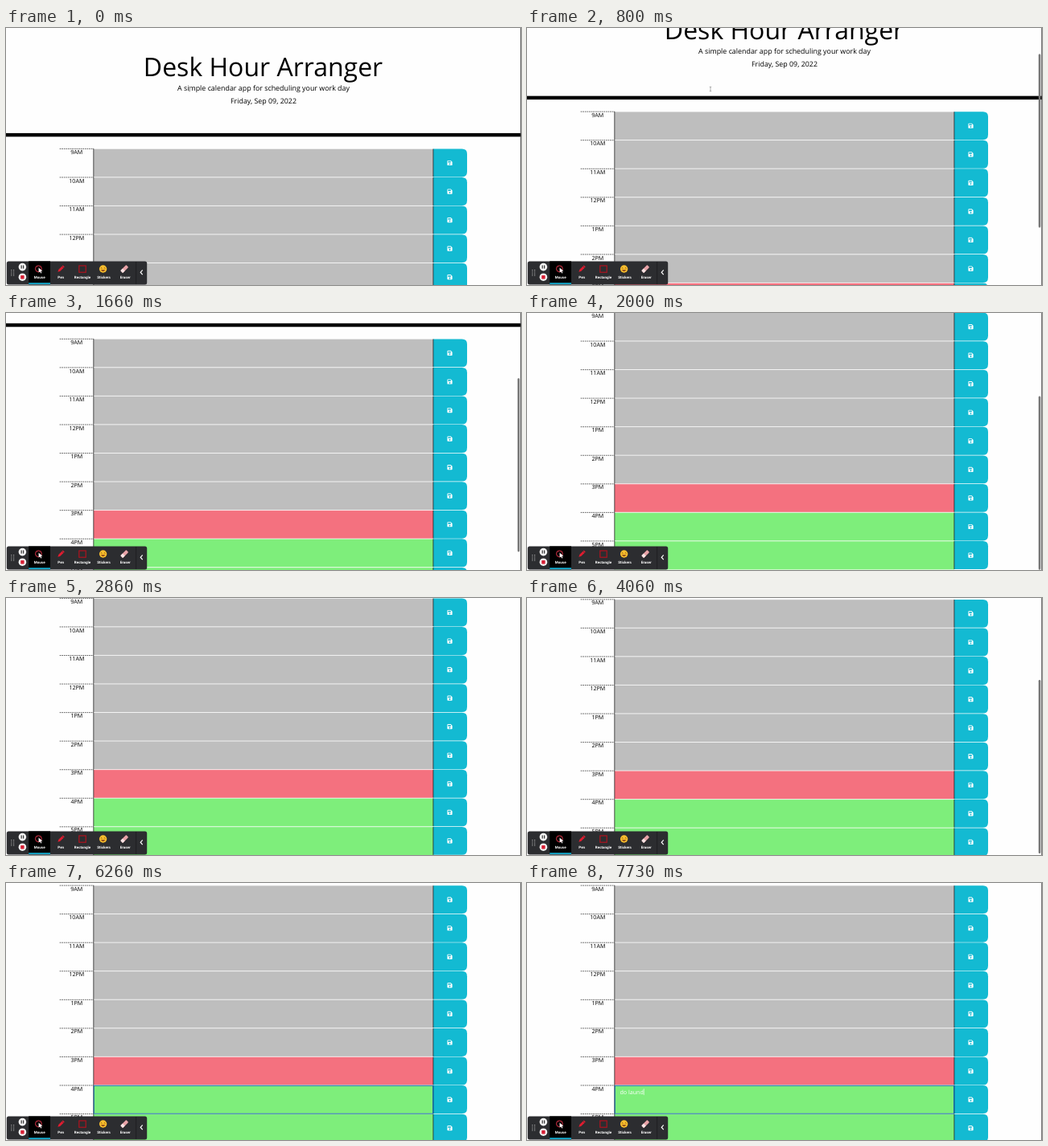
Write an HTML page that moves like this. It is 640 px wide and 320 px high and loops after 8000 ms.

```html
<!DOCTYPE html>
<html lang="en">
<head>
<meta charset="utf-8">
<title>Day planner</title>
<style>
@property --scroll { syntax: "<number>"; inherits: true; initial-value: 0; }
html, body { margin: 0; width: 100%; height: 100%; overflow: hidden; background: #fefefe; }
#stage { display: block; width: 640px; height: 320px; font-family: "Open Sans", sans-serif; animation: scroll 8s linear infinite; }
text { text-anchor: middle; text-rendering: geometricPrecision; }
#page { transform: translateY(calc(var(--scroll) * -1px)); }
#thumb { transform: translateY(calc(var(--scroll) * .68px)); animation: thumb 8s linear infinite; }
#beam { animation: beam 8s linear infinite; }
#focus { fill: none; stroke: #1560b4; stroke-width: .95; animation: focus 8s step-end infinite; }
.title { font-size: 32px; }
.lead { font-size: 8.889px; }
.hour, #typed { font-size: 7.111px; }
#typed { fill: #fff; text-anchor: start; white-space: pre; }
.dash { stroke: #222; stroke-width: .7; stroke-dasharray: 1.7 .9; }
.seam { stroke: #fff; stroke-width: .8; }
.side { stroke: #222; stroke-width: .8; }
.tool { font: 700 4.5px Roboto, sans-serif; fill: #fff; }

@keyframes scroll {
  0%, 2.2% { --scroll: 0; }
  10% { --scroll: 46.2; }
  16.625% { --scroll: 73.2; }
  20% { --scroll: 110; }
  23.5% { --scroll: 147; }
  25% { --scroll: 150.9; }
  34% { --scroll: 150; }
  42.5% { --scroll: 150; }
  58%, 100% { --scroll: 147.3; }
}
@keyframes thumb {
  0%, 2.4% { opacity: 0; }
  3.4%, 32% { opacity: 1; }
  35%, 42% { opacity: 0; }
  43.4%, 62% { opacity: 1; }
  63.25%, 100% { opacity: 0; }
}
@keyframes beam {
  0%, 13.2% { transform: translate(228px, 76px); opacity: 1; }
  13.25%, 52% { transform: translate(228px, 76px); opacity: 0; }
  53.2% { transform: translate(214px, 120px); opacity: 0; }
  53.25% { transform: translate(214px, 120px); opacity: 1; }
  58.3%, 67.4% { transform: translate(166px, 268px); opacity: 1; }
  67.5%, 100% { transform: translate(166px, 268px); opacity: 0; }
}
@keyframes focus {
  0% { opacity: 0; }
  60% { opacity: 1; }
  100% { opacity: 1; }
}
</style>
</head>
<body>
<svg id="stage" viewBox="0 0 640 320">
  <defs>
    <path id="save" fill="#fff" fill-rule="evenodd" d="M-2.4-3.1H1.3L3.1-1.3V2.4Q3.1 3.1 2.4 3.1H-2.4Q-3.1 3.1-3.1 2.4V-2.4Q-3.1-3.1-2.4-3.1Z
      M-2.2-2.2V-.5H1.3V-2.2Z M0 .4A.9 .9 0 1 0 .01 .4Z"/>
  </defs>

  <g id="page">
    <text class="title" x="319.5" y="60">Desk Hour Arranger</text>
    <text class="lead" x="320" y="78">A simple calendar app for scheduling your work day</text>
    <text class="lead" x="320" y="94">Friday, Sep 09, 2022</text>
    <rect y="130.9" width="640" height="4.45"/>
    <g id="rows"></g>
    <rect id="focus" x="109.2" y="399.6" width="421.4" height="34.9"/>
    <text id="typed" x="115.5" y="410"></text>
    <rect id="caret" y="403.4" width=".6" height="8" fill="#fff"/>
  </g>

  <rect id="thumb" x="635.7" y="1" width="2.6" height="216" rx="1.3" fill="#777"/>
  <path d="M639.6 0V320" stroke="#444" stroke-width=".8"/>

  <g id="beam" fill="none">
    <path d="M-1.2-2.8Q0-2.8 0-2Q0-2.8 1.2-2.8M0-2.2V2.2M-1.2 2.8Q0 2.8 0 2Q0 2.8 1.2 2.8" stroke="#fff" stroke-width="1.5" opacity=".7"/>
    <path d="M-1.2-2.8Q0-2.8 0-2Q0-2.8 1.2-2.8M0-2.2V2.2M-1.2 2.8Q0 2.8 0 2Q0 2.8 1.2 2.8" stroke="#777" stroke-width=".6"/>
  </g>

  <g id="toolbar">
    <rect x=".8" y="290.4" width="174.4" height="29" rx="2.5" fill="#2c2d30"/>
    <path d="M6.8 301V308.5M9.6 301V308.5" stroke="#b5b5b5" stroke-width="1.1" stroke-dasharray="1.1 1.1"/>
    <g fill="#f3f3f3"><circle cx="20.4" cy="297.6" r="4.8"/><circle cx="20.4" cy="310.2" r="4.8"/></g>
    <path d="M19.2 295.6V299.6M21.6 295.6V299.6" stroke="#333" stroke-width="1.2"/>
    <rect x="18.2" y="308" width="4.4" height="4.4" rx=".6" fill="#d81f35"/>
    <rect x="28.2" y="290.4" width="26.8" height="29"/>
    <rect x="28.2" y="317.2" width="26.8" height="1.9" fill="#12a9cc"/>

    <circle cx="40.4" cy="299.8" r="3.9" fill="none" stroke="#e2354a" stroke-width="1"/>
    <path d="M40.5 298.6L45.4 302.4L43.2 302.7L44.4 304.9L43.4 305.4L42.2 303.2L40.7 304.6Z" fill="#fff"/>

    <g transform="translate(68.2 300) rotate(45)">
      <path d="M-1.4-5H1.4V2.6L0 5.4L-1.4 2.6Z" fill="#e01c30"/>
      <path d="M-1.4-3.4H1.4" stroke="#2c2d30" stroke-width=".7"/>
    </g>

    <rect x="90.8" y="296" width="8.4" height="8.2" fill="none" stroke="#b0121f" stroke-width="1.2"/>

    <circle cx="120.6" cy="300" r="4.7" fill="#f9bd2c"/>
    <path d="M117.8 299.4Q118.6 298 119.4 299.4M121.8 299.4Q122.6 298 123.4 299.4" fill="none" stroke="#5c3413" stroke-width=".8"/>
    <path d="M117.8 301.2Q120.6 304.8 123.4 301.2Z" fill="#7a3517"/>

    <g transform="translate(147.2 300) rotate(45)">
      <rect x="-2" y="-5" width="4" height="10" rx=".8" fill="#e9a3a8"/>
      <path d="M-2 1.2H2V4.2Q2 5 1.2 5H-1.2Q-2 5-2 4.2Z" fill="#f5e3e3"/>
    </g>

    <path d="M161.6 291V319" stroke="#1d1e20" stroke-width=".8"/>
    <path d="M169.7 301.3L167.2 304.2L169.7 307.1" fill="none" stroke="#fff" stroke-width="1.2"/>
    <g class="tool">
      <text x="41.7" y="312">Mouse</text>
      <text x="68.2" y="312">Pen</text>
      <text x="95" y="312">Rectangle</text>
      <text x="121.5" y="312">Stickers</text>
      <text x="148.2" y="312">Eraser</text>
    </g>
  </g>
</svg>
<script>
const $ = id => document.getElementById(id);
const TOP = 150.2, PITCH = 320 / 9;
const hours = ["9AM", "10AM", "11AM", "12PM", "1PM", "2PM", "3PM", "4PM", "5PM"];
const tint = i => i < 6 ? "#bebebe" : i === 6 ? "#f4717f" : "#7eee7b";

$("rows").innerHTML = hours.map((hour, i) => `
  <g transform="translate(0 ${TOP + i * PITCH})">
    <rect x="108.9" width="422.2" height="${PITCH + .1}" fill="${tint(i)}"/>
    <path d="M531 .3H566.7Q573 .3 573 6.6V28.9Q573 35.2 566.7 35.2H531Z" fill="#13bad2"/>
    <path class="seam" d="M109 .1H531"/>
    <path class="dash" d="M66.7 .2H108.9"/>
    <path class="side" d="M108.8 0V${PITCH}M530.9 .4V35.2"/>
    <text class="hour" x="87.8" y="6.8">${hour}</text>
    <use href="#save" x="551.5" y="17.8"/>
  </g>`).join("");

const note = "do laund";
const keyTimes = [6930, 7060, 7130, 7330, 7460, 7530, 7600, 7720];
const blinks = [5060, 5400, 5730, 6200, 6660];
const typed = $("typed"), caret = $("caret");
const countPast = (times, t) => times.filter(x => x <= t).length;
const start = performance.now();

function draw() {
  const t = Math.max(0, performance.now() - start) % 8000;
  typed.textContent = note.slice(0, countPast(keyTimes, t));
  const width = typed.textContent ? typed.getComputedTextLength() : 0;
  caret.setAttribute("x", 115.5 + width);
  caret.setAttribute("opacity", countPast(blinks, t) % 2);
  requestAnimationFrame(draw);
}
draw();
</script>
</body>
</html>
```
